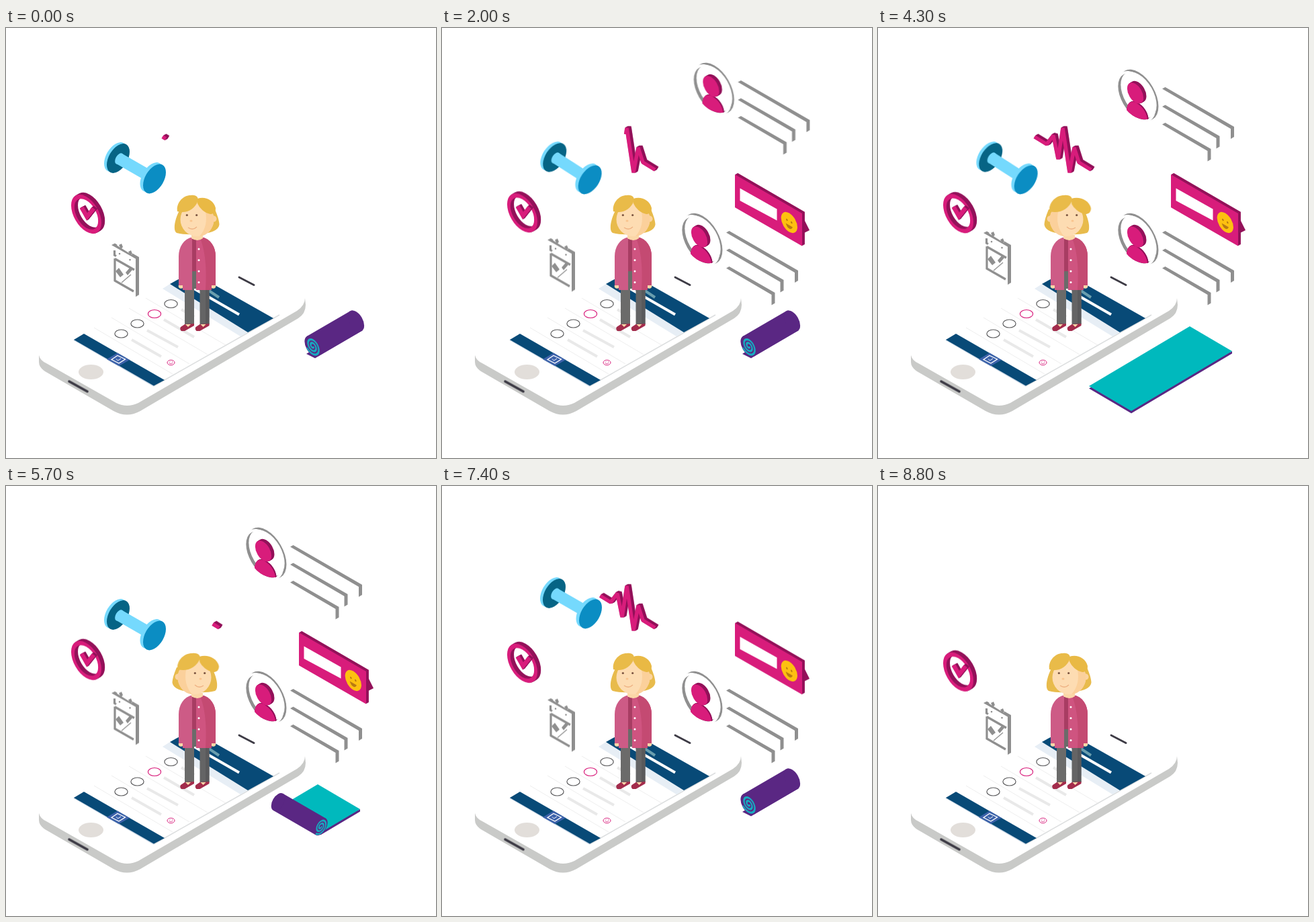
Recreate the animation shown at these times as an HTML page. Size 640x640 px, loop 8.9 s.

```html
<!DOCTYPE html>
<html lang="en">
<head>
<meta charset="utf-8">
<title>Wellbeing app</title>
<style>
  html, body { margin: 0; width: 100%; height: 100%; overflow: hidden; background: #fff; }
  svg { display: block; width: 100%; height: 100%; }
  .loop { animation: 8900ms linear infinite; }
  .card-a { animation-name: card-a; }
  .card-b { animation-name: card-b; }
  .bubble { animation-name: bubble; }
  .leave { animation-name: leave; }
  .head { animation-name: look; animation-timing-function: step-end; }
  .fringe { animation-name: sway; animation-timing-function: step-end; }
  .float { animation: float 2225ms cubic-bezier(.37, 0, .63, 1) infinite; }
  .slow { animation-duration: 8900ms; }
  .lift { animation: lift 2225ms cubic-bezier(.37, 0, .63, 1) infinite; transform-box: fill-box; transform-origin: center; }
  .pulse { stroke-dasharray: 1 2; animation: pulse 2966.667ms linear infinite; }
  .pink { color: #d81c7b; }
  .grey { color: #8f8f8f; }

  /* in along the isometric axis, out straight up */
  @keyframes card-a {
    0%, 1.12% { transform: translate(300px, -173px); animation-timing-function: cubic-bezier(.5, 1, .89, 1); }
    8.54% { transform: none; }
    84.3% { transform: none; animation-timing-function: cubic-bezier(.11, 0, .5, 0); }
    91.5%, 100% { transform: translate(0, -450px); }
  }
  @keyframes bubble {
    0%, 8.99% { transform: translate(235px, -135.5px); animation-timing-function: cubic-bezier(.5, 1, .89, 1); }
    16.4% { transform: none; }
    81.5% { transform: none; animation-timing-function: cubic-bezier(.11, 0, .5, 0); }
    89.5%, 100% { transform: translate(0, -345px); }
  }
  @keyframes card-b {
    0%, 16.85% { transform: translate(300px, -173px); animation-timing-function: cubic-bezier(.5, 1, .89, 1); }
    24.3% { transform: none; }
    75.3% { transform: none; animation-timing-function: cubic-bezier(.11, 0, .5, 0); }
    82.2%, 100% { transform: translate(0, -220px); }
  }
  @keyframes leave {
    0%, 91.6% { transform: none; animation-timing-function: cubic-bezier(.11, 0, .5, 0); }
    97.6%, 100% { transform: translate(0, -510px); }
  }
  @keyframes look {
    0% { transform: none; }
    22.5% { transform: translate(565px, 0) scaleX(-1); }
    75.3%, 100% { transform: none; }
  }
  @keyframes sway {
    0% { transform: none; }
    22.5% { transform: translate(-20px, 0) scaleX(1.08); }
    75.3%, 100% { transform: none; }
  }
  @keyframes float { 50% { transform: translate(0, -18px); } }
  @keyframes lift {
    0%, 8% { transform: none; }
    40% { transform: translate(0, -39px); }
    56% { transform: translate(0, -2px); }
    64%, 78% { transform: none; }
    92% { transform: rotate(3deg); }
    100% { transform: none; }
  }
  @keyframes pulse {
    0% { stroke-dashoffset: .98; }
    44.7%, 49% { stroke-dashoffset: 0; }
    92%, 96% { stroke-dashoffset: -.96; opacity: 1; }
    96.01%, 100% { stroke-dashoffset: -1; opacity: 0; }
  }
</style>
</head>
<body>
<svg viewBox="0 0 640 640" fill="none">
  <defs>
    <g id="card">
      <circle r="34" fill="#8f8f8f" transform="matrix(.866 .5 0 1 388 313.7)"/>
      <circle r="34" fill="#fff" transform="matrix(.866 .5 0 1 384 316)"/>
      <circle r="30.8" fill="#8f8f8f" transform="matrix(.866 .5 0 1 384 316)"/>
      <circle r="30.8" fill="#fff" transform="matrix(.866 .5 0 1 388 313.7)"/>
      <g class="pink" data-depth="2" fill="currentColor">
        <path d="M370 336C371 322 380 321 388 328C396 334 400 342 401 350C390 351 378 346 370 336Z"/>
      </g>
      <g class="pink" data-depth="5" fill="currentColor">
        <circle r="14" transform="matrix(.866 .5 0 1 383 311)"/>
      </g>
      <path fill="#8f8f8f" d="M423 304.5L427.5 302L530 361V376L525 379V364Z
        M423 331L427.5 328.500L508.500 375V390.500L503.500 393.500V378Z
        M423 357.500L427.5 355L495.500 394V409.500L490.500 412.500V397Z"/>
    </g>
    <g id="disc"><ellipse rx="24" ry="13.9" transform="rotate(-60)"/></g>
  </defs>

  <!-- phone -->
  <path d="M49 487Q51 495 60 499L164 558Q180 566 197 558L433 421Q445 413 445 402L446 412Q446 425 435 432L200 570Q180 581 160 570L58 511Q49 505 49 497Z" fill="#c9cac8"/>
  <ellipse cx="126.5" cy="512" rx="18.5" ry="11" fill="#e2deda"/>
  <path d="M94 526L121 541" stroke="#8d8c90" stroke-width="4.5" stroke-linecap="round"/>
  <path d="M94 526L121 541M347 371L369 382.5" stroke="#3d3b45" stroke-width="2.8" stroke-linecap="round"/>
  <path d="M220 533L407 427" stroke="#dcdedf" stroke-width="1.5"/>
  <path d="M101 464L220 533" stroke="#cbd8e6" stroke-width="2"/>
  <path d="M101 464L116 455L236 524L220 532.5Z" fill="#084a77"/>
  <path d="M150 493L166 483.5L184 494L168 503Z" fill="#3c62aa"/>
  <path d="M157 493.5L166 487.5L177.5 493L168 499Z" stroke="#fff" stroke-width="1.3"/>
  <path d="M164 492.5L166.5 495L171 492" stroke="#fff"/>
  <path d="M233 388L244 381L360 453L349 459Z" fill="#e7eef5"/>
  <path d="M244 381L276 363L398 432L360 453Z" fill="#084a77"/>
  <path d="M280 388L347 426.5" stroke="#fff" stroke-width="4"/>
  <path d="M296 387L317 401" stroke="#6a9eae" stroke-width="4"/>
  <path d="M131 446L248 515M157 431L273 500M183 417L300 486M208 402L327 472" stroke="#eee"/>
  <path d="M187 464L231 489M210 450L256 475M235 434L280 460M261 419L280 430" stroke="#e9e9e9" stroke-width="4"/>
  <g stroke="#5b5b5d" stroke-width="1.2" fill="#fff">
    <ellipse cx="171.5" cy="455" rx="9.6" ry="6"/>
    <ellipse cx="195.5" cy="440" rx="9.6" ry="6"/>
    <ellipse cx="221" cy="425.5" rx="9.6" ry="6" stroke="#d81c7b"/>
    <ellipse cx="245.5" cy="410.5" rx="9.6" ry="6"/>
    <ellipse cx="245.5" cy="498" rx="5.5" ry="3.8" stroke="#d81c7b" stroke-width="1"/>
  </g>
  <path d="M242.5 498.5Q245 501 248.5 498.5M243.5 496.5h1M247 496.5h1" stroke="#d81c7b" stroke-width=".8"/>

  <!-- woman -->
  <path d="M266 385H280V441H266Z" fill="#6b6b6a"/>
  <path d="M288.5 385H302.5V441H288.5Z" fill="#646465"/>
  <path d="M297 385H302.5V441H297Z" fill="#5a5a5c"/>
  <g id="shoe">
    <path d="M260 445L266 441L280 440V443L266 451H261Q258 448 260 445Z" fill="#a32c4c"/>
    <path d="M267 441H275L271 445Z" fill="#fbd7a8"/>
  </g>
  <use href="#shoe" x="22.5"/>
  <circle cx="260.5" cy="384" r="3.8" fill="#fbd7a8"/>
  <circle cx="308.5" cy="384" r="3.8" fill="#fbd7a8"/>
  <path d="M277 314H284V362L277 388Z" fill="#a83d63"/>
  <path d="M277 362H283V388H277Z" fill="#6b6b6a"/>
  <path d="M278 311C264 314 257 326 257 340V383H263V390H277V314Z" fill="#cd5b86"/>
  <path d="M283 313L291 311C305 314 312 326 312 340V383H306V390H283Z" fill="#cf5480"/>
  <path d="M288 311H291C305 314 312 326 312 340V383H306V390H297C299 360 297 330 288 311Z" fill="#c44a72"/>
  <path d="M276 308H293V313Q285 319 276 313Z" fill="#fbd7a8"/>
  <g fill="#fff">
    <circle cx="287" cy="329" r="1.5"/><circle cx="287" cy="345.5" r="1.5"/>
    <circle cx="287" cy="362" r="1.5"/><circle cx="287" cy="378.5" r="1.5"/>
  </g>
  <g class="loop head">
    <path d="M259 270C251 284 248 302 254 305C264 308 276 307 285 307C302 306 317 302 317.5 292C317 284 313 275 311 270Z" fill="#e8bb4c"/>
    <circle cx="309" cy="284" r="4.5" fill="#fbd3a0"/>
    <ellipse cx="284.5" cy="285" rx="25" ry="25" fill="#fddcb2"/>
    <path d="M294 262C300 280 300 297 288 310C300 309 309 299 309.5 285C309 274 303 265 294 262Z" fill="#fbd09b"/>
    <circle cx="269.3" cy="278.5" r="1.6" fill="#7a5440"/>
    <circle cx="283.7" cy="278.5" r="1.6" fill="#7a5440"/>
    <ellipse cx="275.5" cy="287" rx="2" ry="1.5" fill="#f9c48e"/>
    <path d="M271 297Q278 302 284 296" stroke="#eeb183" stroke-width="1.3"/>
  </g>
  <g class="loop fringe">
    <path d="M285 254C295 250 309 255 312 268C312 275 308 277 304 277C295 275 288 268 285 261Z" fill="#e9b944"/>
    <path d="M255 273C253 262 262 249 275 249C284 248 286 252 286 257C281 270 268 277 255 273Z" fill="#e9bb49"/>
  </g>

  <!-- clipboard -->
  <g class="float slow grey">
    <path d="M157 323L162 320.5L198 341V397L193 400V343.5Z" fill="currentColor"/>
    <path d="M166 322L188 336" stroke="#fff" stroke-width="3.5"/>
    <path d="M168 323L172 321L174 326L171 329ZM182 333L186 331L188 336L185 338Z" fill="currentColor"/>
    <path d="M161.5 331V338L164 339.5M162 343V376L190 392M162 343.5L191 360" stroke="currentColor" stroke-width="3.2"/>
    <path d="M163 362L168 357L175 367L170 371ZM178 364L184 357L188 360L181 368Z" fill="currentColor"/>
    <path d="M172 379L186 367" stroke="currentColor" stroke-width="1.3"/>
    <circle cx="169" cy="336" r="1.3" fill="currentColor"/><circle cx="184.5" cy="345" r="1.3" fill="currentColor"/>
  </g>

  <!-- badge -->
  <g class="float pink">
    <g data-depth="6"><circle r="23.2" stroke="currentColor" stroke-width="5.6" transform="matrix(.866 .5 0 1 119.5 277)"/></g>
    <g data-depth="3.5"><path d="M112.5 267L120.5 281L130.5 268.5" stroke="currentColor" stroke-width="6.5"/></g>
  </g>

  <!-- dumbbell -->
  <g class="loop leave"><g class="lift">
    <use href="#disc" x="163" y="192" fill="#75d9fd"/>
    <use href="#disc" x="167" y="194" fill="#066485"/>
    <ellipse rx="9" ry="5.2" transform="translate(168.5 194.5) rotate(-60)" fill="#75d9fd"/>
    <path d="M168.5 194.5L212 219.5" stroke="#75d9fd" stroke-width="17.5"/>
    <use href="#disc" x="216.5" y="222" fill="#75d9fd"/>
    <use href="#disc" x="221" y="224.5" fill="#0b8dc3"/>
  </g></g>

  <!-- heartbeat -->
  <g class="pink" data-depth="4.5" stroke="currentColor" stroke-width="5.5" stroke-linejoin="bevel">
    <path class="pulse" pathLength="1" d="M233 162L251 173L261 160L268 195L275 149L285 215L292 178L299 200L317 211"/>
  </g>

  <g class="loop card-a"><use href="#card"/></g>
  <g class="loop card-b"><use href="#card" y="-214"/></g>

  <!-- speech bubble -->
  <g class="loop bubble">
    <path d="M539 285L547 301L539 305Z" fill="#93125a"/>
    <g class="pink" data-depth="4.5" fill="currentColor"><path d="M436 218L536 276V324.5L436 267Z"/></g>
    <path d="M443.5 238.5L498.5 269.5V286.5L443.5 257Z" fill="#fff"/>
    <g transform="matrix(.866 .5 0 1 516.8 289.5)">
      <circle r="14" fill="#fdc010"/>
      <circle cx="-4" cy="-2" r="1.5" fill="#b87913"/><circle cx="4" cy="-2" r="1.5" fill="#b87913"/>
      <path d="M-6 4H6Q4 9 0 9Q-4 9 -6 4Z" fill="#b87913"/>
    </g>
  </g>

  <!-- exercise mat -->
  <g class="loop leave">
    <g id="sheet"><path id="edge" fill="#5a2783"/><path id="top" fill="#00b9bd"/></g>
    <path id="flap" d="M447 485L460 491.5L531 450L520 440Z" fill="#5a2783"/>
    <path id="body" fill="#5a2783"/>
    <g id="far"><circle r="1" fill="#5a2783"/></g>
    <g id="near"><circle r="1" fill="#5a2783"/><path id="spiral" stroke="#16abc0" stroke-width=".2"/></g>
  </g>
</svg>
<script>
  const LOOP = 8900, LENGTH = 173;
  const $ = id => document.getElementById(id);
  const clamp = v => Math.min(1, Math.max(0, v));
  const set = (id, values) => Object.entries(values).forEach(([k, v]) => $(id).setAttribute(k, v));

  // stack dark copies behind a face to give it thickness
  document.querySelectorAll('[data-depth]').forEach(face => {
    const depth = +face.dataset.depth, steps = 7;
    for (let i = steps; i > 0; i--) {
      const copy = face.cloneNode(true), d = depth * i / steps;
      copy.removeAttribute('data-depth');
      copy.setAttribute('transform', `translate(${d * .866} ${-d * .5})`);
      copy.style.color = '#93125a';
      face.before(copy);
    }
  });

  const turns = Array.from({ length: 61 }, (_, i) => {
    const a = i / 60 * Math.PI * 4.8, r = .08 + .8 * i / 60;
    return `${(r * Math.cos(a)).toFixed(3)} ${(r * Math.sin(a)).toFixed(3)}`;
  });
  set('spiral', { d: 'M' + turns.join('L') });

  // cylinder between two end points; lean is +1 or -1 for the end face's plane
  function drawRoll([x1, y1], [x2, y2], r, lean) {
    const nx = .612 * r * lean, ny = 1.06 * r;
    set('body', { d: `M${x1 + nx} ${y1 + ny}L${x2 + nx} ${y2 + ny}L${x2 - nx} ${y2 - ny}L${x1 - nx} ${y1 - ny}Z` });
    const face = (x, y) => `matrix(${.866 * r} ${.5 * r * lean} 0 ${r} ${x} ${y})`;
    set('near', { transform: face(x1, y1) });
    set('far', { transform: face(x2, y2) });
  }

  function drawMat(t) {
    const open = t >= 2650 && t < 6075;
    set('sheet', { visibility: open ? 'visible' : 'hidden' });
    set('flap', { visibility: open ? 'hidden' : 'visible' });
    if (!open) return drawRoll([456.5, 473.5], [521, 436], 14, 1);

    const s = LENGTH * Math.min(clamp((t - 2650) / 1000), 1 - clamp((t - 5115) / 960));
    const dx = -.867 * s, dy = .514 * s;
    const sheet = drop => `M464 ${444 + drop}L527 ${481 + drop}L${527 + dx} ${481 + dy + drop}L${464 + dx} ${444 + dy + drop}Z`;
    set('top', { d: sheet(0) });
    set('edge', { d: sheet(3.5) + `M527 481V484.5L${527 + dx} ${484.5 + dy}V${481 + dy}Z` });
    const r = s > LENGTH - 1 ? 0 : 15.1 * Math.sqrt(1 - s / LENGTH);
    const x = 527 + dx, y = 484 + dy - r;
    drawRoll([x, y], [x - 63.5, y - 36.7], r, -1);
  }

  let start;
  function frame(now) {
    start ??= now;
    drawMat((now - start) % LOOP);
    requestAnimationFrame(frame);
  }
  drawMat(0);
  requestAnimationFrame(frame);
</script>
</body>
</html>
```
